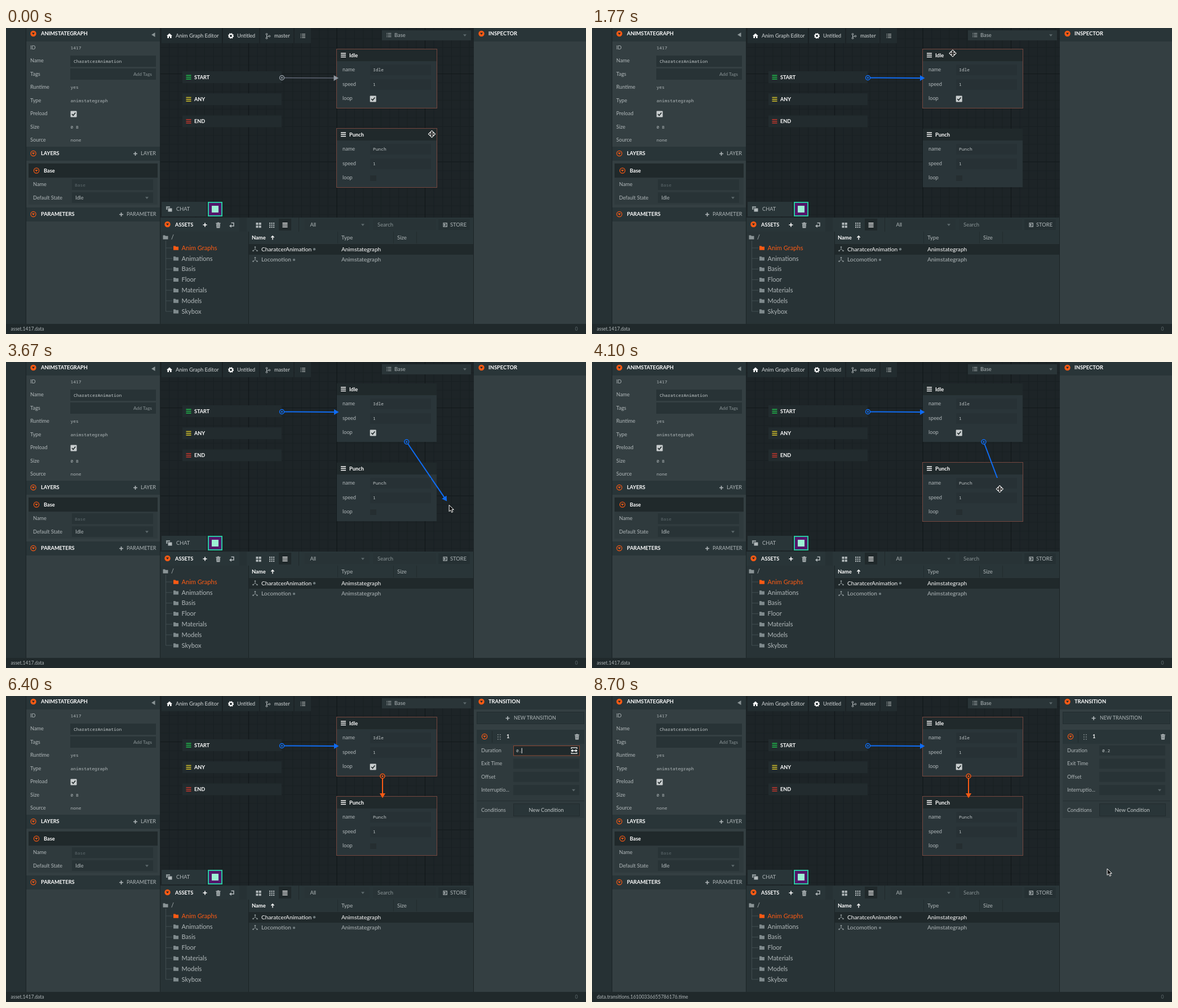
An HTML page that plays this animation: 1029x544 px, repeating every 8.73 s.

```html
<!DOCTYPE html>
<html lang="en">
<head>
<meta charset="utf-8">
<title>Anim Graph Editor</title>
<style>
html, body { margin: 0; width: 100%; height: 100%; overflow: hidden; background: #20292b; }
svg { display: block; width: 1029px; height: 544px; }
text { font-family: Lato, sans-serif; white-space: pre; }
text.mono { font-family: "Noto Sans Mono", monospace; }
</style>
</head>
<body>
<svg id="stage" viewBox="0 0 1029 544" xmlns="http://www.w3.org/2000/svg"></svg>
<script>
const LOOP = 8730;
const C = {
  body: '#343f42', head: '#293538', dark: '#20292b', mid: '#283336', line: '#1b2325',
  field: '#283336', text: '#b1b8ba', dim: '#8a9496', faint: '#5d696c', white: '#fff',
  orange: '#fb5a14', blue: '#0f6cf3', red: '#74473f', canvas: '#1d2427'
};

// ---- markup helpers ----
const rect = (x, y, x2, y2, fill, extra = '') =>
  `<rect x="${x}" y="${y}" width="${x2 - x}" height="${y2 - y}" fill="${fill}" ${extra}/>`;
const box = (x, y, x2, y2, fill, stroke) =>
  rect(x + .5, y + .5, x2 - .5, y2 - .5, fill, `stroke="${stroke}"`);
const path = (d, stroke, w = 1, fill = 'none') =>
  `<path d="${d}" stroke="${stroke}" stroke-width="${w}" fill="${fill}"/>`;
const shape = (d, fill) => `<path d="${d}" fill="${fill}"/>`;
// y is the middle of the line of text
const text = (x, y, s, fill = C.text, size = 9.2, weight = 400, extra = '') =>
  `<text x="${x}" y="${y + size * .35}" font-size="${size}" font-weight="${weight}" fill="${fill}" ${extra}>${s}</text>`;
const bold = (x, y, s, size = 9.2) => text(x, y, s, C.white, size, 700);
const mono = (x, y, s, fill = C.text, extra = '') =>
  text(x, y, s, fill, 7.9, 400, `class="mono" ${extra}`);
const plus = (x, y, c = C.text) => path(`M${x - 3.5} ${y}h7M${x} ${y - 3.5}v7`, c, 1.6);
const caret = (x, y, c = C.faint) => shape(`M${x - 3} ${y - 1.7}h6l-3 3.6z`, c);
const bars = (x, y, c = C.white) =>
  path(`M${x - 4.5} ${y - 3.2}h9m-9 3.2h9m-9 3.2h9`, c, 1.5);
const list = (x, y, c = C.text) =>
  path(`M${x - 1.5} ${y - 3}h6m-6 3h6m-6 3h6M${x - 4} ${y - 3}h1.4m-1.4 3h1.4m-1.4 3h1.4`, c, 1.2);
const fold = (x, y, solid) =>
  `<circle cx="${x}" cy="${y}" r="${solid ? 5.2 : 4.6}" fill="${solid ? C.orange : 'none'}" stroke="${C.orange}" stroke-width="${solid ? 0 : 1.2}"/>` +
  shape(`M${x - 2.6} ${y - 1.4}h5.2l-2.6 3.4z`, solid ? C.dark : C.orange);
const folder = (x, y, c) =>
  shape(`M${x - 4.5} ${y - 3.5}h3.5l1 1.2h4.5v6h-9z`, c);
const check = (x, y) =>
  rect(x - 5.5, y - 5.5, x + 5.5, y + 5.5, '#c9cecf', 'rx="1"') +
  path(`M${x - 3} ${y}l2.2 2.4 4-5`, C.dark, 1.6);
const trash = (x, y, c = C.text) =>
  shape(`M${x - 4} ${y - 4}h2.4l.6-1h2l.6 1h2.4v1.4h-8zM${x - 3.4} ${y - 2}h6.8l-.5 7h-5.8z`, c) +
  path(`M${x - 1.2} ${y - .5}v4m2.4-4v4`, C.head, .7);
const grid9 = (x, y, n, size, step) => {
  let s = '';
  for (let i = 0; i < n * n; i++) {
    const px = x + (i % n) * step, py = y + (i / n | 0) * step;
    s += rect(px, py, px + size, py + size, C.text);
  }
  return s;
};
const turn = (x, y, c = C.text) =>
  path(`M${x - 1} ${y - 3.5}h4.5v5.5h-6`, c, 1.5) + shape(`M${x - 4.5} ${y + 2}l3.8-3v6z`, c);
const shop = (x, y, c = C.text) =>
  path(`M${x - 3} ${y - 1.5}v-1.7h6.2v6.4h-6.200v-1.700`.replace(/00/g, ''), c, 1.3) +
  path(`M${x - 4} ${y}h3`, c, 1.3) + shape(`M${x - 1.5} ${y - 2.2}l2.800 2.200-2.800 2.200z`, c);

// ---- panels ----
function leftPanel() {
  let s = rect(0, 0, 35, 526, '#263134') + rect(35, 0, 274, 526, C.line) +
    rect(36, 0, 273, 24, C.head) + rect(36, 24, 273, 211, C.body) +
    rect(36, 211, 273, 236, C.head) + rect(36, 236, 273, 319, C.body) +
    rect(36, 319, 273, 344, C.head) + rect(36, 344, 273, 526, C.body);
  s += fold(48.5, 10, true) + bold(62, 10, 'ANIMSTATEGRAPH') + shape('M264.5 8v8l-6.5-4z', C.dim);
  const rows = { ID: '1417', Name: '', Tags: '', Runtime: 'yes', Type: 'animstategraph', Preload: '', Size: '0 B', Source: 'none' };
  Object.keys(rows).forEach((k, i) => {
    const y = 34.5 + i * 23.5;
    s += text(43, y, k) + mono(114.5, y + .7, rows[k]);
  });
  s += rect(114, 49, 266, 69, C.field) + mono(120, 59, 'CharatcerAnimation', '#c3c9ca') +
    rect(114, 72, 266, 92, C.field) + text(259, 82, 'Add Tags', C.dim, 8.4, 400, 'text-anchor="end"') +
    check(120, 153);
  s += fold(48.5, 223) + bold(62, 223, 'LAYERS') + plus(229.5, 223.5) + text(239, 223, 'LAYER') +
    rect(40, 240, 269, 314, '#2f3a3d') + rect(40, 241, 269, 266, C.dark) +
    fold(54, 253.5) + bold(67, 253.5, 'Base') +
    text(48, 278, 'Name') + rect(117, 269, 261, 288, C.field) + mono(122, 279, 'Base', C.faint) +
    text(48, 301.5, 'Default State', C.text, 9) + rect(117, 292, 261, 311, C.field) +
    text(123, 301.5, 'Idle') + caret(250, 302);
  return s + fold(48.5, 331) + bold(62, 331, 'PARAMETERS') + plus(204.5, 331.5) +
    text(214, 331, 'PARAMETER', C.text, 9);
}

function graph() {
  let s = rect(274, 0, 830, 337, C.canvas), minor = '', major = '';
  for (let i = -10; i < 26; i++) {
    const x = 430.5 + i * 15.65;
    if (x > 274 && x < 829) i % 10 ? minor += `M${x} 0V337` : major += `M${x} 0V337`;
    const y = 81.5 + i * 15.65;
    if (y > 0 && y < 337) i % 10 ? minor += `M274 ${y}H830` : major += `M274 ${y}H830`;
  }
  s += path(minor, '#192023', 1) + path(major, '#12181a', 1.2);
  [[276, 383], [385, 449], [451, 510], [512, 541]].forEach(b => s += rect(b[0], 0, b[1], 27, '#222c2f'));
  s += shape('M285 14l5-4.5 5 4.5h-1.4v4h-2.6v-3h-2v3h-2.6v-4z', C.white) + text(301, 14, 'Anim Graph Editor', '#d5d9da', 9.4);
  s += '<circle cx="399" cy="14" r="3" fill="none" stroke="#fff" stroke-width="2"/>' +
    '<circle cx="399" cy="14" r="4.4" fill="none" stroke="#fff" stroke-width="1.3" stroke-dasharray="1.7 1.756"/>' +
    text(410, 14, 'Untitled', '#d5d9da', 9);
  s += path('M462.5 12v5M462.5 16.5q0-2 4-2', C.text, 1);
  [[462.5, 11], [462.5, 18], [467.5, 14.5]].forEach(p => s += `<circle cx="${p[0]}" cy="${p[1]}" r="1.4" fill="none" stroke="${C.text}"/>`);
  s += text(476, 14, 'master', '#d5d9da') + list(526.5, 14, '#d5d9da');
  s += rect(667, 4, 825, 22, '#2a3538') + list(679, 12.5) + text(689, 12.5, 'Base', C.text, 9.4) + caret(814, 13);
  [['START', '#1fc14c'], ['ANY', '#d9c62a'], ['END', '#c5372c']].forEach(([name, c], i) => {
    const y = 87.5 + i * 39.2;
    s += rect(313, y - 10.5, 489, y + 10.5, '#222b2e') + bars(324, y, c) + bold(334, y, name, 9.1);
  });
  return s + rect(276, 309, 356, 335, C.head) +
    rect(284, 317, 291, 323, C.dim) + rect(287, 320, 295, 327, C.text, `stroke="${C.head}"`) +
    text(302, 322, 'CHAT') + rect(358, 309, 384, 335, '#2ac9a0') + rect(360, 311, 382, 333, '#54166a') +
    rect(365, 316, 377, 328, '#9df0d4');
}

const NODES = [{ name: 'Idle', x: 587, y: 38 }, { name: 'Punch', x: 587, y: 179 }];
const nodeBack = n => rect(n.x, n.y, n.x + 177, n.y + 104, '#2a3539') +
  rect(n.x, n.y, n.x + 177, n.y + 21, C.dark) + bars(n.x + 11.5, n.y + 10.3) +
  text(n.x + 22, n.y + 10.3, n.name, C.white, 9.3, 700);
const nodeRing = (n, i) =>
  rect(n.x - .5, n.y - .5, n.x + 177.5, n.y + 104.5, 'none', `id="ring${i}" stroke="${C.red}"`);
const nodeFront = (n, i) =>
  ['name', 'speed', 'loop'].map((k, j) => text(n.x + 10, n.y + 35.5 + j * 25.8, k)).join('') +
  rect(n.x + 59, n.y + 27, n.x + 167, n.y + 46, '#273135') + mono(n.x + 64, n.y + 36.7, n.name, '#c3c9ca') +
  rect(n.x + 59, n.y + 53, n.x + 167, n.y + 72, '#273135') + mono(n.x + 64, n.y + 62.6, '1', '#c3c9ca') +
  (i ? rect(n.x + 59, n.y + 83, n.x + 70, n.y + 93, '#252e31') : check(n.x + 64.2, n.y + 88));

function assets() {
  let s = rect(274, 337, 830, 526, C.line) + rect(274, 337, 829, 362, C.head) +
    rect(274, 362, 430, 526, C.mid) + rect(431, 362, 829, 526, '#2b3639') + rect(431, 362, 829, 383, C.head);
  s += fold(286.5, 349, true) + bold(300, 349.5, 'ASSETS') + plus(353, 350, C.white) + trash(376.5, 350.5) + turn(400.5, 350);
  s += rect(414, 337, 427, 362, '#263134') + rect(519, 337, 520, 362, C.dark) +
    grid9(443.5, 346, 2, 4, 5.2) + grid9(467, 346, 3, 2.2, 3.5) + rect(484, 339, 506, 360, C.dark) + bars(495, 350.3);
  s += rect(530, 340, 645, 359, C.field) + text(539.5, 349.5, 'All') + caret(633, 350) +
    rect(651, 340, 763, 359, C.field) + text(659, 349.5, 'Search', C.dim, 9.5) +
    rect(767, 340, 823, 359, '#253033') + shop(779, 350) + text(788, 350, 'STORE', C.text, 9.4);
  s += folder(283, 372, C.dim) + text(293, 372, '/', C.text, 10.8);
  ['Anim Graphs', 'Animations', 'Basis', 'Floor', 'Materials', 'Models', 'Skybox'].forEach((k, i) => {
    const y = 391 + i * 18.8, c = i ? C.dim : C.orange;
    s += path(`M283.5 ${y}h12`, '#414d50', 1) + folder(301.5, y, i ? '#7f8a8d' : c) + text(311.5, y, k, i ? C.text : c, 11.1);
  });
  s += path('M283.5 378V504', '#414d50', 1);
  s += text(436, 372.5, 'Name', C.white, 9.4, 700) + path('M473 376.5v-6.5m-2.6 2.4l2.6-2.7 2.6 2.7', C.white, 1.4) +
    text(595, 372.5, 'Type', C.text, 9.6) + text(694, 372.5, 'Size', C.text, 9.6) +
    path('M588.5 362v21M687.5 362v21M728.5 362v21', '#222c2e') + rect(431, 384, 829, 403, C.dark);
  [['CharatcerAnimation', 547], ['Locomotion', 511]].forEach(([k, dot], i) => {
    const y = 393 + i * 18.8, c = i ? C.text : C.white;
    s += path(`M442 ${y - 4}v4l-3.5 3M442 ${y}l3.5 3`, C.dim, 1) +
      [[442, -3.5], [438.5, 3], [445.5, 3]].map(p => `<circle cx="${p[0]}" cy="${y + p[1]}" r="1.3" fill="${C.dim}"/>`).join('') +
      text(453, y, k, c, 10.2) + `<circle cx="${dot}" cy="${y + .3}" r="2.2" fill="#6d797c"/>` +
      text(595, y, 'Animstategraph', c, 10.1);
  });
  return s;
}

function transition() {
  let s = box(835, 28, 1026, 50, C.head, '#232d30') + plus(890, 39.5) + text(901, 39.3, 'NEW TRANSITION', C.text, 8.8) +
    rect(835, 60, 1026, 217, '#2f3a3d') + rect(835, 60, 1026, 85, C.head) + fold(849, 72) +
    path('M862.5 62v21', C.dark);
  for (let i = 0; i < 6; i++) s += rect(872 + i % 2 * 4, 68 + (i / 2 | 0) * 4, 873.6 + i % 2 * 4, 69.6 + (i / 2 | 0) * 4, C.dim);
  s += bold(888, 72, '1') + trash(1013, 72.5);
  ['Duration', 'Exit Time', 'Offset', 'Interruptio...'].forEach((k, i) => {
    const y = 97 + i * 23.4;
    s += text(843, y - .5, k) + rect(900, y - 9, 1017, y + 9, C.field);
  });
  return s + caret(1007, 167.5) + path('M835 186.5h191', '#252f32') + text(843, 202.5, 'Conditions') +
    box(900, 191, 1018, 214, C.head, '#222c2f') +
    text(958.5, 202.7, 'New Condition', '#c3c9ca', 9.4, 400, 'text-anchor="middle"');
}

const slider = path('M1003 94v-2.2h10v2.2M1003 100.5v1.7h10v-1.7', C.white, 1.2) +
  path('M1004 97.3h8', C.white, 1.4) + shape('M1002 97.3l3.5-2.7v5.4zM1014 97.3l-3.5-2.7v5.4z', C.white);
const arrow = path('M0 0V11.5L2.7 9 4.6 13.2 6.7 12.2 4.9 8.3H8.3Z', C.white, 1, '#111');
const move = shape('M0-6.8L6.8 0 0 6.8-6.8 0z', C.white) + path('M-4 0h8M0-4v8', '#111', 1.5) +
  [0, 90, 180, 270].map(a => `<path d="M0-5.4l2.1 2.3h-4.2z" fill="#111" transform="rotate(${a})"/>`).join('') +
  path('M-2.2-2.2h1.2M1-2.2h1.2M-2.2 2.2h1.2M1 2.2h1.2', '#111', 1.2);

const stage = document.getElementById('stage');
stage.innerHTML = rect(0, 0, 1029, 544, C.line) + leftPanel() + graph() +
  NODES.map(nodeBack).join('') + NODES.map(nodeRing).join('') +
  '<g id="edges"></g>' + NODES.map(nodeFront).join('') + assets() +
  rect(830, 0, 1029, 24, C.head) + rect(830, 24, 1029, 526, C.body) + fold(843.5, 10, true) +
  text(856, 10, '', C.white, 9.3, 700, 'id="title"') +
  `<g id="panel">${transition()}<rect id="focus" x="900.5" y="88.5" width="117" height="17.5" fill="${C.dark}" stroke="#8e4a35"/>` +
  mono(905, 97.4, '', '#c3c9ca', 'id="value"') + '<path id="caret" d="M0 92.5v9.5" stroke="#fff"/>' +
  `<g id="slider">${slider}</g></g>` +
  rect(0, 526, 1029, 544, C.dark) + text(8.5, 535, '', C.text, 8.5, 400, 'id="status"') +
  text(1009.5, 535, '0', C.faint, 8.7) +
  `<g id="arrow">${arrow}</g><g id="move">${move}</g>`;

const $ = id => document.getElementById(id);
const show = (id, on) => $(id).setAttribute('visibility', on ? 'inherit' : 'hidden');

// ---- motion ----
const KEYS = [
  [0, 755.5, 188.5], [60, 755.5, 188.5], [700, 450, 295], [990, 450, 295], [1700, 640, 45], [2670, 640, 45],
  [2870, 728, 61], [3150, 798, 115], [3400, 796, 190], [3570, 777, 238.5], [3770, 795, 269.5],
  [4130, 722, 225], [4400, 722, 225], [4720, 778, 264], [4830, 778, 264], [5370, 1000, 97],
  [8070, 1000, 97], [8600, 914, 307], [LOOP, 914, 307]
];
const DESELECT = 800, PULL = 2670, DROP = 4150, FOCUS = 5570, COMMIT = 7130;
const TYPING = [[6200, '0'], [6400, '0.'], [6730, '0.2']];

function pointer(t) {
  const i = Math.max(1, KEYS.findIndex(k => k[0] > t));
  const [t0, x0, y0] = KEYS[i - 1], [t1, x1, y1] = KEYS[i];
  const p = (t - t0) / (t1 - t0), e = p * p * (3 - 2 * p);
  return [x0 + (x1 - x0) * e, y0 + (y1 - y0) * e];
}
const over = (n, [x, y]) => x > n.x && x < n.x + 177 && y > n.y && y < n.y + 104;

function edge(x, y, tx, ty, c, w = 2, tip = c) {
  const a = Math.atan2(ty - y, tx - x), deg = a * 180 / Math.PI;
  return path(`M${x} ${y}L${tx - 7 * Math.cos(a)} ${ty - 7 * Math.sin(a)}`, c, w) +
    `<path d="M0 0L-8.5-5V5Z" fill="${tip}" transform="translate(${tx} ${ty}) rotate(${deg})"/>` +
    `<circle cx="${x}" cy="${y}" r="4" fill="${C.dark}" stroke="${tip}" stroke-width="1.5"/>` +
    `<circle cx="${x}" cy="${y}" r="1.5" fill="${tip}"/>`;
}

// Loose edge leaves the node where the line from its centre crosses the border
function looseEdge([x, y]) {
  const cx = 675.5, cy = 90, dx = x - cx, dy = y - cy;
  const k = Math.min(88.5 / Math.abs(dx || 1e-6), 52 / Math.abs(dy || 1e-6));
  const s = k < 1 ? k : 0;
  return edge(cx + dx * s, cy + dy * s, x, y, C.blue);
}

function draw(t) {
  const p = pointer(t), linked = t >= DROP, early = t < DESELECT;
  const onField = t >= 5400 && t < 8090, focused = t >= FOCUS && t < COMMIT;

  NODES.forEach((n, i) => show('ring' + i, early || linked || over(n, p)));
  let e = early ? edge(489.5, 88.5, 590, 89, '#6a7080', 1.3, '#9097a0') : edge(489.5, 88.5, 590.5, 89, C.blue);
  if (linked) e += edge(668, 142.5, 668, 181.5, C.orange);
  else if (t >= PULL) e += looseEdge(pointer(t - 30));
  $('edges').innerHTML = e;

  $('title').textContent = linked ? 'TRANSITION' : 'INSPECTOR';
  show('panel', linked);
  show('focus', linked && focused);
  show('slider', linked && onField);
  const typed = TYPING.filter(k => t >= k[0]).pop();
  const value = typed ? typed[1] : '';
  $('value').textContent = value;
  $('caret').setAttribute('transform', `translate(${905.7 + value.length * 4.74} 0)`);
  show('caret', focused);
  $('status').textContent = t >= 7200 ? 'data.transitions.16100336655786176.time' : 'asset.1417.data';

  const grab = NODES.some(n => over(n, p));
  show('arrow', !grab && !onField);
  show('move', grab && !onField);
  $(grab ? 'move' : 'arrow').setAttribute('transform', `translate(${p[0]} ${p[1]})`);
}

const begin = performance.now();
function tick() {
  draw((performance.now() - begin) % LOOP);
  requestAnimationFrame(tick);
}
tick();
</script>
</body>
</html>
```
